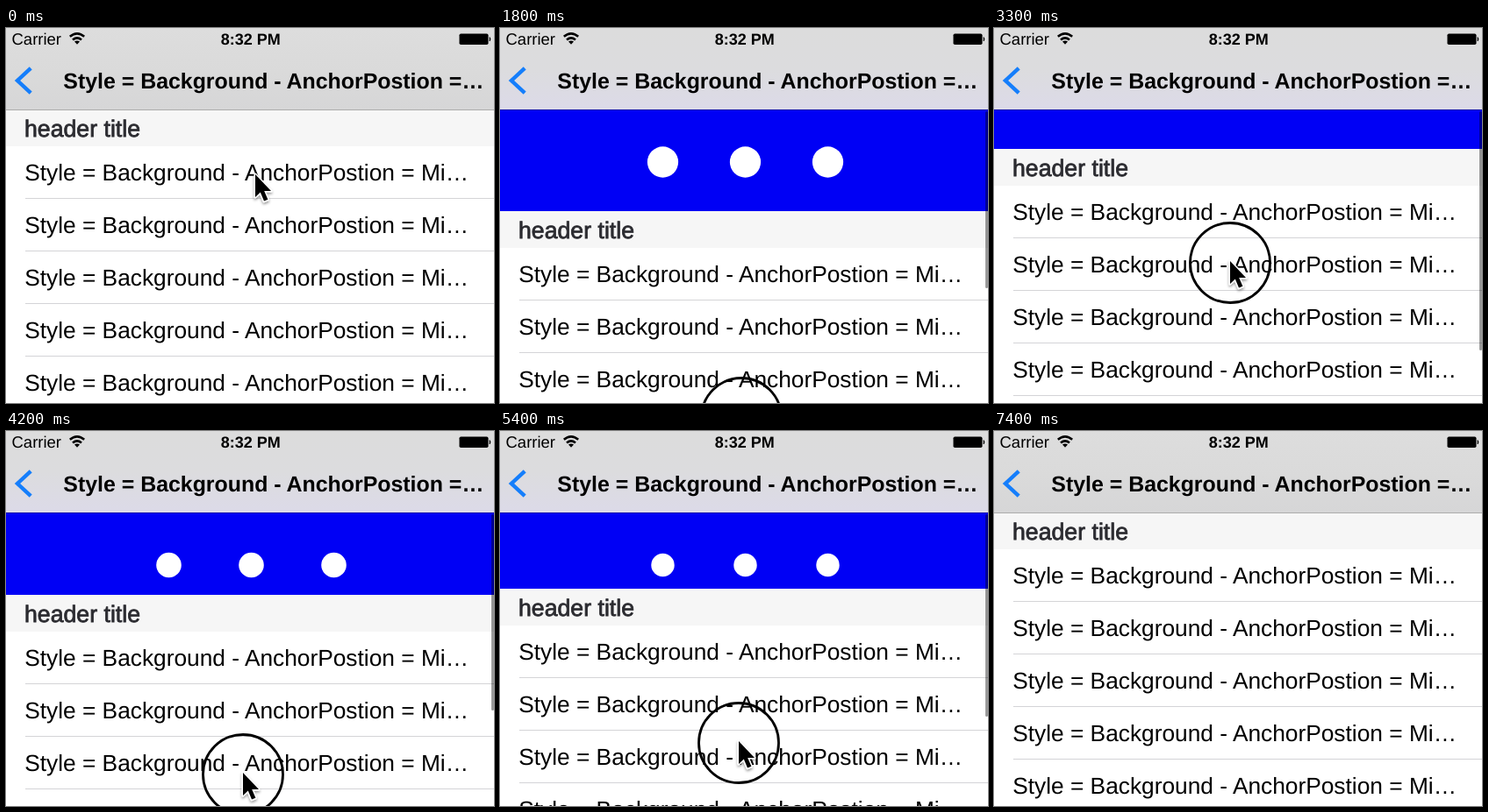
Recreate the animation shown at these times as an HTML page. Size 556 px wide and 428 px high, loop 7500 ms.

```html
<!DOCTYPE html>
<html lang="en">
<head>
<meta charset="utf-8">
<title>Pull to refresh</title>
<style>
  html, body { margin: 0; width: 100%; height: 100%; overflow: hidden; background: #fff; }
  svg { display: block; width: 556px; height: 428px; }
  text { font-family: "Liberation Sans", Arial, sans-serif; white-space: pre; text-rendering: geometricPrecision; }
  .row { font-size: 26.3px; }
  .head { font-size: 26.7px; fill: #2b2b30; stroke: #2b2b30; stroke-width: .8px; }
  .title { font-size: 24.9px; font-weight: bold; }
  .time { font-size: 18px; font-weight: bold; }
  .carrier { font-size: 18.5px; }
</style>
</head>
<body>
<svg viewBox="0 0 556 428">
  <defs>
    <linearGradient id="grey" x1="0" y1="0" x2="0" y2="1">
      <stop offset="0" stop-color="#dddddd"/>
      <stop offset=".55" stop-color="#dadada"/>
      <stop offset="1" stop-color="#d6d6d7"/>
    </linearGradient>
    <linearGradient id="tint" x1="0" y1="0" x2="0" y2="1">
      <stop offset="0" stop-color="#dcdcdc"/>
      <stop offset=".5" stop-color="#dcdcde"/>
      <stop offset="1" stop-color="#dcdae8"/>
    </linearGradient>
    <filter id="shade" x="-50%" y="-30%" width="220%" height="180%">
      <feDropShadow dx="0" dy="2" stdDeviation="1.6" flood-opacity=".4"/>
    </filter>
  </defs>

  <rect y="93" width="556" height="335" fill="#0000f5"/>
  <g id="dots" fill="#fff"></g>

  <g id="list">
    <rect y="93" width="556" height="400" fill="#fff"/>
    <rect y="93" width="556" height="42" fill="#f6f6f6"/>
    <text class="head" x="21" y="124">header title</text>
  </g>
  <rect id="bar" x="553" y="95" width="3" rx="1.5" fill="#000" fill-opacity=".4"/>

  <rect width="556" height="93" fill="url(#grey)"/>
  <rect id="glow" width="556" height="93" fill="url(#tint)"/>
  <rect y="93" width="556" height="1" fill="#000" fill-opacity=".3"/>

  <text class="carrier" x="6.5" y="19">Carrier</text>
  <g fill="none" stroke="#000" stroke-width="2.6">
    <path d="M72.8 9.8Q81 2.8 89.2 9.8"/>
    <path d="M76 13.4Q81 9.2 86 13.4"/>
  </g>
  <path d="M78 15.6Q81 13.4 84 15.6L81 18.8Z"/>
  <text class="time" x="278.7" y="19" text-anchor="middle">8:32 PM</text>
  <rect x="516.5" y="6.5" width="33" height="12.5" rx="1.8"/>
  <path d="M551 10.5Q553 12.7 551 15Z" stroke="#000" stroke-width=".6"/>
  <path d="M28.2 45.8L13 60L28.2 74.2" fill="none" stroke="#157efb" stroke-width="4.4"/>
  <text class="title" x="65.3" y="69">Style = Background - AnchorPostion =…</text>

  <circle id="touch" r="45.5" fill="none" stroke="#000" stroke-width="2.8"/>
  <path id="arrow" d="M0 0V26L5.8 20.6L10 30.6L14.4 28.8L10.2 19H18Z" stroke="#fff"
        stroke-width="3" paint-order="stroke" stroke-linejoin="round" filter="url(#shade)"/>
</svg>
<script>
  const LOOP = 7500, STEP = 100, PRESS = 200, RELEASE = 7000, HIDE = 7300;
  // time, touch x, touch y, pull distance
  const path = [
    [0, 284, 169, 0],
    [PRESS, 284, 169, 0],
    [1100, 280, 420, 106],
    [1600, 277, 452, 117],
    [2500, 270, 366, 95],
    [3300, 269, 268, 45],
    [4200, 270, 392, 94],
    [4700, 271, 428, 109],
    [5400, 272, 356, 87],
    [6400, 286, 256, 38],
    [RELEASE, 286, 169, 0],
    [LOOP, 286, 169, 0]
  ];

  const $ = id => document.getElementById(id);
  function add(parent, name, attrs, text = "") {
    const el = document.createElementNS("http://www.w3.org/2000/svg", name);
    for (const key in attrs) el.setAttribute(key, attrs[key]);
    el.textContent = text;
    return parent.appendChild(el);
  }

  const dots = [185.5, 279.5, 373.5].map(cx => add($("dots"), "circle", { cx, cy: 153 }));
  for (let i = 0; i < 5; i++) {
    const y = 135 + i * 60;
    add($("list"), "text", { class: "row", x: 21.2, y: y + 39 },
      "Style = Background - AnchorPostion = Mi…");
    add($("list"), "rect", { x: 22, y: y + 59, width: 534, height: 1, fill: "#d4d4d7" });
  }

  // Slope at a key: flat where the motion turns around
  function slope(i, col) {
    const a = path[i - 1], b = path[i], c = path[i + 1];
    if (!a || !c || (b[col] - a[col]) * (c[col] - b[col]) <= 0) return 0;
    return (c[col] - a[col]) / (c[0] - a[0]);
  }

  function valueAt(t, col) {
    const i = path.findIndex((key, n) => t < path[n + 1][0]);
    const a = path[i], b = path[i + 1];
    const span = b[0] - a[0], u = (t - a[0]) / span, v = 1 - u;
    return a[col] * (1 + 2 * u) * v * v + b[col] * u * u * (3 - 2 * u)
      + span * u * v * (slope(i, col) * v - slope(i + 1, col) * u);
  }

  function draw(t) {
    const x = Math.round(valueAt(t, 1)), y = Math.round(valueAt(t, 2));
    const pull = Math.max(0, Math.round(valueAt(t, 3)));
    const shown = Math.min(1, pull / 10);

    $("list").setAttribute("transform", `translate(0 ${pull})`);
    dots.forEach(dot => dot.setAttribute("r", pull * 0.152));
    $("bar").setAttribute("height", 318 - pull);
    $("bar").setAttribute("opacity", shown);
    $("glow").setAttribute("opacity", shown);

    $("touch").setAttribute("transform", `translate(${x} ${y})`);
    $("touch").setAttribute("visibility", t >= PRESS && t < RELEASE ? "visible" : "hidden");
    $("arrow").setAttribute("transform", `translate(${x} ${y - 2})`);
    $("arrow").setAttribute("visibility", t < HIDE ? "visible" : "hidden");
  }

  const start = performance.now();
  function tick() {
    const t = (performance.now() - start) % LOOP;
    draw(Math.floor(t / STEP) * STEP);
    requestAnimationFrame(tick);
  }
  tick();
</script>
</body>
</html>
```
